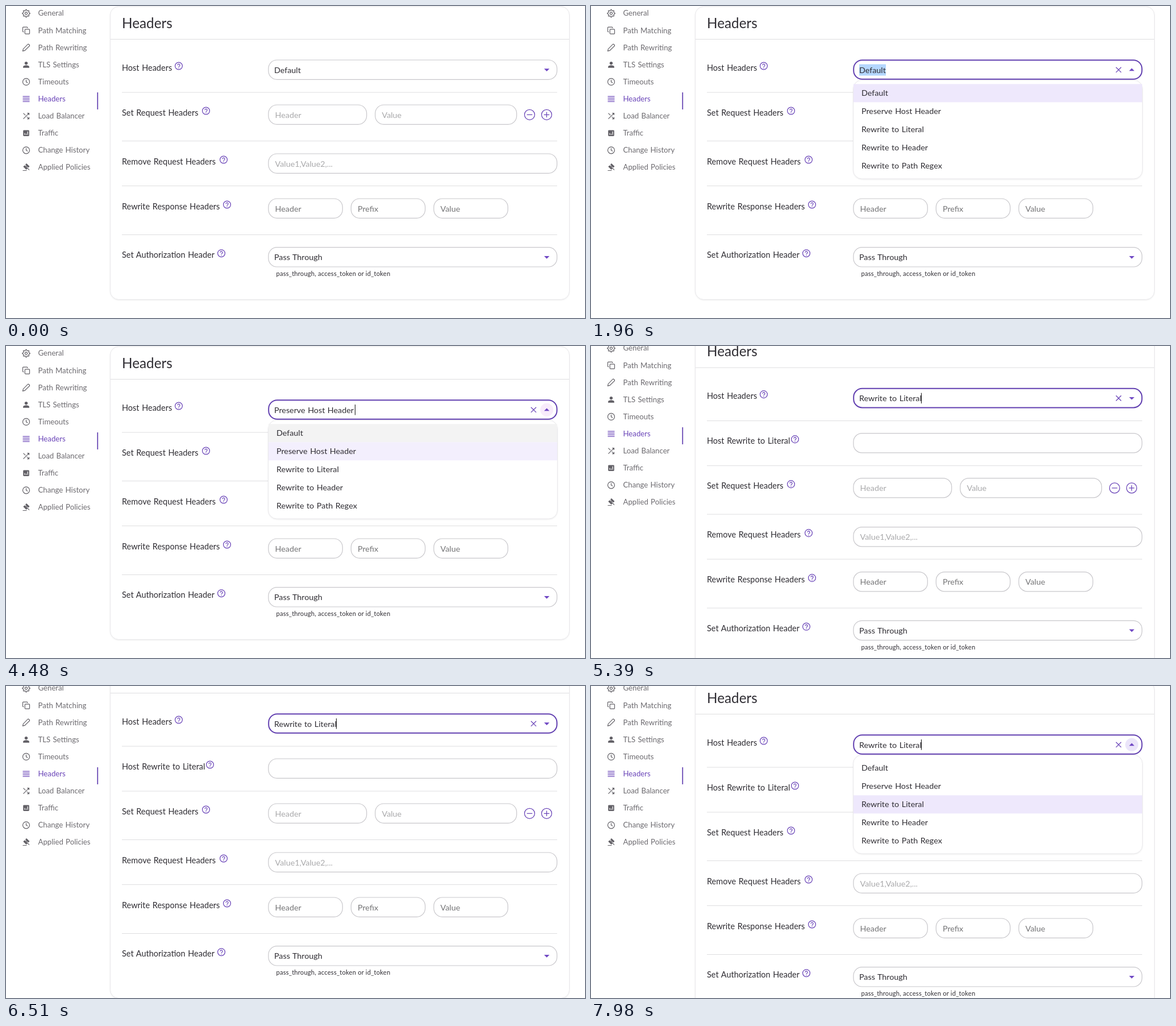
Recreate the animation shown at these times as an HTML page. Size 1019 by 549 pixels, loop 8 s.

```html
<!DOCTYPE html>
<html lang="en">
<head>
<meta charset="utf-8">
<title>Header settings</title>
<style>
html, body { margin: 0; width: 100%; height: 100%; overflow: hidden; background: #fff; }
svg { display: block; width: 1019px; height: 549px; font: 14.3px Lato, sans-serif; word-spacing: .9px; }
text { fill: #2f2d33; white-space: pre; }
.title { font-size: 24.3px; }
.label { font-size: 14.5px; }
.nav { font-size: 13.2px; fill: #6d6b70; }
.nav.on { fill: #6a45b8; }
.hint { fill: #a9a9ab; }
.soft { fill: #747476; }
.help { font-size: 11.2px; letter-spacing: .2px; word-spacing: 0; }
.line { stroke: #dedee0; fill: none; }
.field { fill: #fff; stroke: #c8c7cb; stroke-width: 1.2; }
.focus { stroke: #613fb0; stroke-width: 2; }
.icon { fill: none; stroke: #626066; stroke-width: 1.2; }
.icon .solid { fill: #626066; stroke: none; }
.icon.on, .mark { fill: none; stroke: #6a45b8; stroke-width: 1.25; }
.paper { fill: #fff; stroke: #e8e7ea; filter: drop-shadow(0 1px 1px #0001); }
.arrow { fill: #7048c4; }
</style>
</head>
<body>
<svg id="stage" viewBox="0 0 1019 549"></svg>
<script>
const LOOP = 8000, ROW = 79;
const OPTIONS = ['Default', 'Preserve Host Header', 'Rewrite to Literal', 'Rewrite to Header', 'Rewrite to Path Regex'];
const CARET_X = [519, 614.5, 581.5];

// Each track lists [start time, value]; values hold until the next start.
const TRACKS = {
  choice: [[0, 0], [3080, 1], [5390, 2]],
  open: [[0, 0], [1960, 1], [3080, 0], [4130, 1], [5390, 0], [7700, 1]],
  caret: [[0, 0], [1190, 1], [1680, 0], [3080, 1], [3570, 0], [4130, 1], [4620, 0], [5180, 1],
    [5950, 0], [6440, 1], [6930, 0], [7000, 1], [7560, 0], [7700, 1]],
  scroll: [[0, 0], [5390, -20.4], [6090, -52], [6160, -79], [6440, -72], [6510, -46], [6580, -20], [6650, -9]]
};
const keyAt = (name, t) => TRACKS[name].filter(k => k[0] <= t).pop();

const text = (x, y, s, cls = '') => `<text x="${x}" y="${y}" class="${cls}">${s}</text>`;
const path = (d, cls = '') => `<path d="${d}" class="${cls}"/>`;
const circle = (x, y, r, cls = '') => `<circle cx="${x}" cy="${y}" r="${r}" class="${cls}"/>`;
const rect = (x, y, w, h, r, cls, fill) =>
  `<rect x="${x}" y="${y}" width="${w}" height="${h}" rx="${r}" class="${cls}"${fill ? ` fill="${fill}"` : ''}/>`;
const group = (x, y, body, cls = '') => `<g transform="translate(${x} ${y})" class="${cls}">${body}</g>`;

const gear = 'M' + Array.from({ length: 32 }, (_, i) => {
  const a = (i - .5) * Math.PI / 16, r = i % 4 < 2 ? 6.6 : 5;
  return (r * Math.cos(a)).toFixed(1) + ' ' + (r * Math.sin(a)).toFixed(1);
}).join('L') + 'z';
const clock = circle(0, 0, 6) + path('M0-3.6V.2L2.8 1.8');

const NAV = [
  ['General', path(gear) + circle(0, 0, 2.1)],
  ['Path Matching', rect(-2.2, -2.2, 8.2, 8.2, 1.2, '') + path('M-4 2.4H-5a1 1 0 0 1-1-1V-5a1 1 0 0 1 1-1H1.4a1 1 0 0 1 1 1v1')],
  ['Path Rewriting', path('M3-6Q4-6.5 5.2-5.2T6-3L-2.5 5.2-6 6l.8-3.5z')],
  ['TLS Settings', circle(0, -2.7, 2.7, 'solid') + path('M-5.4 5.4V3.8C-5.4 1.8-2.2.9 0 .9s5.4.9 5.4 2.9v1.6z', 'solid')],
  ['Timeouts', clock],
  ['Headers', path('M-6-4.5H6M-6-1.5H6M-6 1.5H6M-6 4.5H6')],
  ['Load Balancer', path('M-5-5L-1.2-1.2M1.2 1.2L5 5M5-5L-5 5M1.8-5H5V-1.8M1.8 5H5V1.8')],
  ['Traffic', rect(-5.3, -5.3, 10.6, 10.6, 1.4, 'solid') + '<path d="M-2.6 3V0M0 3V1M2.6 3V-3" stroke="#fff"/>'],
  ['Change History', clock],
  ['Applied Policies', path('M-1.6-4.8L.6-7 6-1.6 3.8.6zM-5.2-1.2L-3-3.4 2.4 2 .2 4.2z', 'solid') +
    path('M-3.5-2.5L2.5-1.5M0-1L5.5 4.8M-6 5.6H1')]
];

const sidebar = y => NAV.map(([name, icon], i) => {
  const cy = 13 + y + i * 30.1, on = i === 5 ? ' on' : '';
  return group(35.5, cy, icon, 'icon' + on) + text(56.5, cy + 4.4, name, 'nav' + on);
}).join('') + rect(160.4, 152 + y, 1.7, 30, 0, '', '#613fb0');

const label = (y, s, helpX) => text(204, y + 18.5, s, 'label') +
  group(helpX, y + 10.5, circle(0, 0, 6.4) + path('M-2-1.3a2 2 0 1 1 3.2 1.5Q0 1 0 1.9M0 3v1.3'), 'mark');
const frame = (x, y, w) => rect(x + .3, y, w - .6, 34.3, 15, 'field');
const field = (x, y, w, s = '', cls = 'hint') => frame(x, y, w) + text(x + 12, y + 22.7, s, cls);
const divider = y => path(`M204 ${y}H970`, 'line');
const arrow = (y, up) => path(up ? `M947 ${y + 2}h9.4l-4.7-4.7z` : `M947 ${y - 2}h9.4l-4.7 4.7z`, 'arrow');

function menu(y, s) {
  const row = (i, fill) => rect(462, y + 42.3 + i * 32, 508, 32, 0, '', fill);
  const back = s.passed ? row(0, '#f3f3f3') + row(1, '#f3effd') : row(s.choice, '#eee8fc');
  return rect(461.6, y + 35.5, 508.8, 173.5, 15, 'paper') + back +
    OPTIONS.map((o, i) => text(476, y + 63.2 + i * 32, o)).join('');
}

function hostSelect(y, s) {
  const mid = y + 17.3;
  let out = s.focus ? rect(462.2, y + .2, 507.4, 33.6, 15, 'field focus') : frame(461.6, y, 508.4);
  if (s.open) {
    out += `<circle cx="951.7" cy="${mid}" r="11.5" opacity="${s.fade}" fill="${s.passed ? '#f8ecfb' : '#ebe5fa'}"/>`;
    if (s.selected) out += rect(472, y + 7.5, 47, 20, 0, '', '#b4d7fe');
  }
  out += text(472, y + 22.5, OPTIONS[s.choice]) + arrow(mid, s.open);
  if (s.focus) out += group(928.5, mid, path('M-4.6-4.6L4.6 4.6M4.6-4.6L-4.6 4.6'), 'mark');
  if (s.caret) out += rect(CARET_X[s.choice] - .6, y + 8, 1.1, 18.5, 0, '', '#222');
  return out;
}

function form(s) {
  const extra = s.choice === 2 ? ROW : 0;
  const row = y => y + extra;
  return group(0, s.scroll,
    rect(183.5, 1, 808, 515.5 + extra, 15, 'paper') +
    text(204, 38.5, 'Headers', 'title') + path('M184 58.5H991', 'line') +
    label(95, 'Host Headers', 304) + divider(152) +
    (extra ? label(174, 'Host Rewrite to Literal', 359) + field(461.6, 174, 508.4) + divider(231) : '') +
    label(row(174), 'Set Request Headers', 352) +
    field(461.6, row(174), 173.4, 'Header') + field(649.5, row(174), 249.5, 'Value') +
    group(921.5, row(191.3), circle(0, 0, 9) + path('M-4.8 0H4.8'), 'mark') +
    group(951.5, row(191.3), circle(0, 0, 9) + path('M-4.8 0H4.8M0-4.8V4.8'), 'mark') +
    divider(row(237.5)) +
    label(row(260), 'Remove Request Headers', 383) + field(461.6, row(260), 508.4, 'Value1,Value2,...') +
    divider(row(316.5)) +
    label(row(339), 'Rewrite Response Headers', 389) + field(461.6, row(339), 131, 'Header', 'soft') +
    field(607, row(339), 131, 'Prefix', 'soft') + field(752.6, row(339), 131, 'Value', 'soft') +
    divider(row(402.5)) +
    label(row(424.7), 'Set Authorization Header', 379) + frame(461.6, row(424.7), 508.4) +
    text(472, row(447), 'Pass Through') + arrow(row(442)) +
    text(475.5, row(475), 'pass_through, access_token or id_token', 'help') +
    (s.open ? menu(95, s) : '') + hostSelect(95, s));
}

function scene(t) {
  const [since, open] = keyAt('open', t);
  const s = {
    open,
    choice: keyAt('choice', t)[1],
    caret: keyAt('caret', t)[1],
    scroll: keyAt('scroll', t)[1],
    focus: t >= 1190,
    selected: t >= 1960 && t < 3080,
    passed: t >= 4480 && t < 5390,
    fade: Math.min(1, Math.floor((t - since) / 70) / 4)
  };
  return sidebar(t >= 5390 ? -9 : 0) + form(s);
}

const stage = document.getElementById('stage');
let shown = '';
function tick(now) {
  const next = scene(now % LOOP);
  if (next !== shown) stage.innerHTML = shown = next;
  requestAnimationFrame(tick);
}
tick(performance.now());
</script>
</body>
</html>
```
